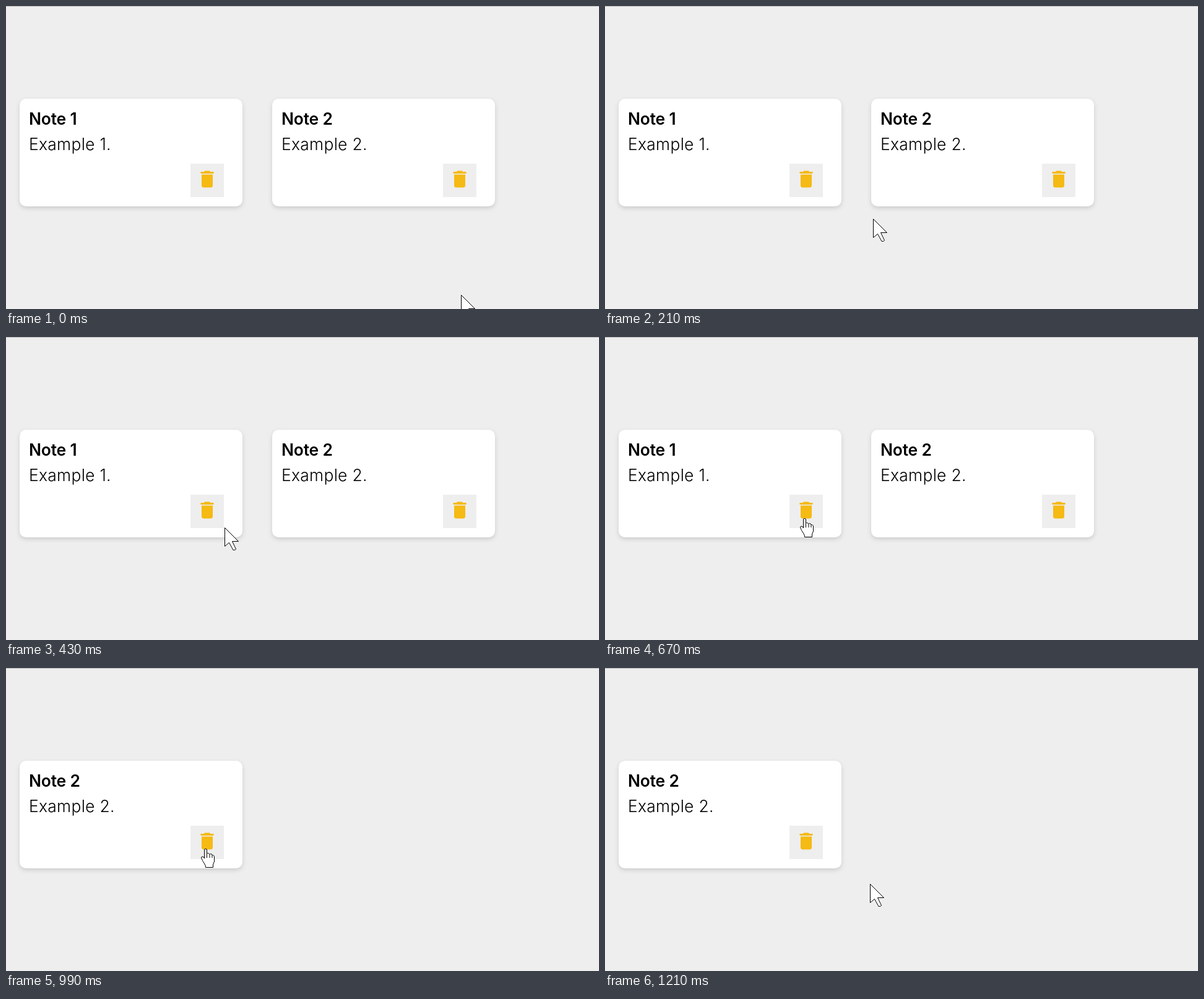
An HTML page that plays this animation: 958x490 px, repeating every 1310 ms.

```html
<!DOCTYPE html>
<html lang="en">
<head>
<meta charset="utf-8">
<title>Notes</title>
<style>
  html, body { margin: 0; width: 100%; height: 100%; overflow: hidden; background: #eee; }
  .stage { position: relative; width: 958px; height: 490px; overflow: hidden; background: #eee; }
  .stage::before { content: ""; position: absolute; inset: 0 0 auto; height: 1px; background: #b9b9b9; }

  .card {
    position: absolute; top: 150px; width: 360px; height: 174px;
    border-radius: 10.5px; background: #fff; box-shadow: 0 3px 7.5px #ccc;
  }
  .card svg { display: block; }
  .first { left: 22px; }
  .second { left: 430px; }
  text { font: 300 26.4px Inter, "Open Sans", sans-serif; letter-spacing: .3px; }
  .title { font-weight: 600; letter-spacing: -.2px; }

  .overlay { position: absolute; inset: 0; }
  .pointer { fill: #fff; stroke: #000; }

  .first, .second, .arrow, .hand, .click { animation: 1310ms step-end infinite; }
  .first { animation-name: remove; }
  .second { animation-name: shift; }
  .arrow { animation-name: arrow; }
  .hand { animation-name: hand; }
  .click { animation-name: click; }

  @keyframes remove { 0% { visibility: visible; } 75.57%, 100% { visibility: hidden; } }
  @keyframes shift { 0% { transform: none; } 75.57%, 100% { transform: translateX(-408px); } }
  @keyframes click {
    0% { visibility: hidden; }
    66.41% { visibility: visible; }
    75.57%, 100% { visibility: hidden; }
  }
  @keyframes arrow {
    0% { transform: translate(735px, 467px); visibility: visible; }
    7.63% { transform: translate(557px, 390px); }
    16.03% { transform: translate(433px, 344px); }
    23.66% { transform: translate(380px, 321px); }
    32.82% { transform: translate(353px, 308px); visibility: visible; }
    41.98% { transform: translate(353px, 308px); visibility: hidden; }
    83.2% { transform: translate(366px, 315px); visibility: visible; }
    92.36%, 100% { transform: translate(428px, 349px); visibility: visible; }
  }
  @keyframes hand {
    0% { transform: translate(320px, 295px); visibility: hidden; }
    41.98% { transform: translate(320px, 295px); visibility: visible; }
    51.14% { transform: translate(315px, 293px); visibility: visible; }
    66.41% { transform: translate(315px, 292px); visibility: visible; }
    83.2%, 100% { transform: translate(315px, 292px); visibility: hidden; }
  }
</style>
</head>
<body>
<div class="stage">
  <div class="card first">
    <svg width="360" height="174">
      <defs>
        <g id="trash">
          <rect x="276" y="105" width="54" height="54" fill="#eee"/>
          <path transform="translate(285 112) scale(1.5)" fill="#f5ba13"
            d="M6 19c0 1.1.9 2 2 2h8c1.1 0 2-.9 2-2V7H6zM19 4h-3.5l-1-1h-5l-1 1H5v2h14z"/>
        </g>
      </defs>
      <text class="title" x="15" y="42">Note 1</text>
      <text x="15" y="83">Example 1.</text>
      <use href="#trash"/>
    </svg>
  </div>
  <div class="card second">
    <svg width="360" height="174">
      <text class="title" x="15" y="42">Note 2</text>
      <text x="15" y="83">Example 2.</text>
      <use href="#trash"/>
    </svg>
  </div>
  <svg class="overlay" width="958" height="490">
    <path class="pointer arrow"
      d="M.5 .5V30.5L7.5 24.5 14 36.5H17L18.5 35 12.5 22.5H22.5Z"/>
    <path class="pointer hand"
      d="M5.5 16V2Q5.5 .5 7.5 .5T9.5 2V8.5Q10 7.5 11.5 7.5T14 9.5Q14.5 8.5 16 8.5T18 11Q18.5 10.5 19.5 10.5T21.5 13V21L19.5 26V30.5H7.5L7 27 2.5 19.5 .5 15Q.5 13 2.5 13T5.5 16ZM9.5 8.5V15M14 9.5V15M18 11V15"/>
    <circle class="click" cx="322" cy="292" r="18" fill="#ff0" fill-opacity=".5"/>
  </svg>
</div>
</body>
</html>
```
